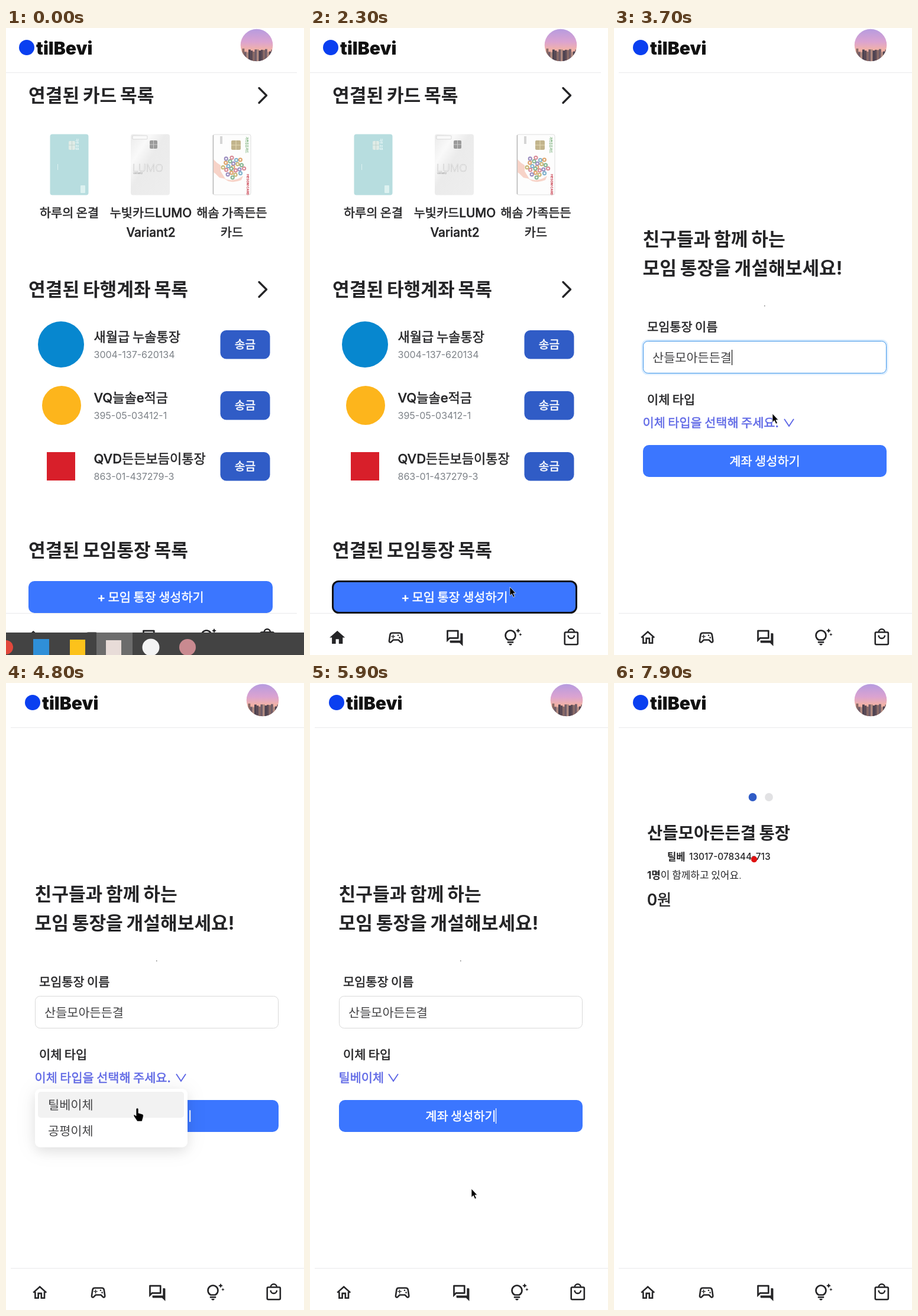
Animation of 504 by 1060 pixels, one loop 8 s. Source, as an HTML page:

```html
<!DOCTYPE html>
<html lang="ko">
<head>
<meta charset="utf-8">
<style>
html, body { margin: 0; width: 100%; height: 100%; overflow: hidden; background: #fff; }
svg { display: block; }
text { font-family: Inter, "Noto Sans CJK KR", "Noto Sans CJK", sans-serif; word-spacing: -.05em; white-space: pre; }
#menuBox { fill: #fff; filter: drop-shadow(0 8px 10px #0001) drop-shadow(0 3px 16px #00000014); }
</style>
</head>
<body>
<svg id="stage" width="504" height="1060" viewBox="0 0 504 1060"></svg>
<script>
const INK = '#252527', SOFT = '#444446', BLUE = '#3b76ff', NAVY = '#305cc6', LINK = '#5f68e6';
const BASE = 20.8;
const ACCOUNT = '산들모아든든결';

// ---- drawing helpers (text is placed by its vertical centre) ----
// A hairline stroke thickens medium text, as the Korean font has no medium weight.
const text = (x, cy, size, str, { w = 500, fill = INK, anchor = 'start', extra = '' } = {}) =>
  `<text x="${x}" y="${cy + size * .37}" font-size="${size}" font-weight="${w}" fill="${fill}" text-anchor="${anchor}"
    ${w === 500 && size > 16 ? `stroke="${fill}" stroke-width=".5"` : ''} ${extra}>${str}</text>`;
const rect = (x, y, w, h, fill, r = 0, extra = '') =>
  `<rect x="${x}" y="${y}" width="${w}" height="${h}" rx="${r}" fill="${fill}" ${extra}/>`;
const circle = (x, y, r, fill, extra = '') => `<circle cx="${x}" cy="${y}" r="${r}" fill="${fill}" ${extra}/>`;
const line = (d, width, color = INK, extra = '') =>
  `<path d="${d}" fill="none" stroke="${color}" stroke-width="${width}" ${extra}/>`;
const group = (id, body, extra = '') => `<g id="${id}" ${extra}>${body}</g>`;
const button = (x, y, w, h, fill, size, label) =>
  rect(x, y, w, h, fill, 10) + text(x + w / 2, y + h / 2, size, label, { fill: '#fff', anchor: 'middle' });
const heading = (x, cy, str) => text(x, cy, 31.2, str, { w: 700 });
const chevron = cy => line(`M428 ${cy - 12}l12.5 12.5l-12.5 12.5`, 3.4, INK, 'stroke-linecap="round" stroke-linejoin="round"');

function header() {
  let seed = 7, skyline = '';
  const random = () => (seed = seed * 16807 % 2147483647) / 2147483647;
  const tones = ['#5b4a55', '#8a6a66', '#6f5c68', '#b08a80', '#4c4250'];
  for (let i = 0; i < 16; i++) {
    const h = 13 + random() * 9;
    skyline += rect(396 + i * 3.5, 56 - h, 3.8, h, tones[i % 5]);
  }
  return circle(35, 33, 13, '#0a3ff0') + text(51, 33.5, 30, 'tilBevi', { w: 900, fill: '#111' }) +
    `<g clip-path="url(#face)">${rect(396, 1, 56, 56, 'url(#sky)')}${skyline}</g>`;
}

function navigation() {
  const home = 'M10 20v-6h4v6h5v-8h3L12 3 2 12h3v8z';
  const icons = [
    `<path id="homeFull" d="${home}"/>` +
      group('homeLine', line('M3.5 12L12 4.4L20.5 12M6 11v8h4v-6h4v6h4v-8', 2)),
    line('M7.5 6h9a3 3 0 0 1 3 2.6l1.1 7.6c.2 1.6-1.4 2.4-2.6 1.4L15.4 15H8.6L6 17.6c-1.2 1-2.8.2-2.6-1.4l1.1-7.6a3 3 0 0 1 3-2.6z', 2) +
      line('M6 10.5h5M8.5 8v5', 1.1) + circle(15, 9, 1, INK) + circle(17, 12, 1, INK),
    '<path transform="scale(1.05)" fill-rule="evenodd" d="M3 2h13a1 1 0 0 1 1 1v9a1 1 0 0 1-1 1H6l-4 4V3a1 1 0 0 1 1-1zM4 4v8.2L5.2 11H15V4zM19 6h2a1 1 0 0 1 1 1v15l-4-4H7a1 1 0 0 1-1-1v-2h13z"/>',
    line('M6 15a6.5 6.5 0 1 1 6 0z', 2) + line('M5 18h8', 2) +
      '<path d="M7 20h4a2 2 0 0 1-4 0zM19 0l1 2l2 1l-2 1l-1 2l-1-2l-2-1l2-1zM22 6l.6 1.4L24 8l-1.4.6L22 10l-.6-1.4L20 8l1.4-.6z"/>',
    line('M5 5h14a1.500 1.500 0 0 1 1.500 1.500V19.500a1.500 1.500 0 0 1-1.500 1.500H5a1.500 1.500 0 0 1-1.500-1.500V6.500A1.500 1.500 0 0 1 5 5zM8 5a4 4 0 0 1 8 0M8 9a4 4 0 0 0 8 0', 2)
  ];
  return icons.map((icon, i) =>
    `<g fill="${INK}" transform="translate(${30.6 + 98.9 * i} 1015) scale(1.3)">${icon}</g>`).join('');
}

function cards() {
  const label = (x, cy, str) => text(x, cy, BASE, str, { anchor: 'middle' });
  const upright = (x, y, size, str, fill) =>
    `<text transform="translate(${x} ${y}) rotate(90)" font-size="${size}" font-weight="700" fill="${fill}">${str}</text>`;
  const dots = ['#dfa46c', '#86b592', '#9c8fc0', '#d98c98', '#82b3cc', '#c9b878'];
  let art = '';
  for (let i = 0; i < 22; i++) {
    const r = 4.1 * Math.sqrt(i), a = i * 2.4, x = 384 + r * Math.cos(a), y = 235 + r * Math.sin(a);
    art += circle(x, y, 3.6, dots[i % 6]) + circle(x, y, 1.5, '#fff');
  }
  return rect(74.5, 179.5, 65, 103, '#b7dddf', 4) + rect(106, 191, 11, 15, '#dfebe6', 2) +
    line('M106 198h11M111.5 191v15', .7, '#b5ccc6') +
    upright(119, 187, 5, '하루 온결', '#eefafa') + rect(126, 266, 8, 13, '#dcf1f0', 1) + rect(87, 230, 1, 10, '#dcf1f0') +
    rect(211, 179.5, 66, 103, 'url(#silver)', 4) + rect(243, 190, 13, 14, '#9a9a9a', 2) +
    line('M243 197h13M249.5 190v14', 1, '#ccc') + rect(214, 182, 25, 6, '#fafafa', 1, 'stroke="#c4c4c4" stroke-width=".6"') +
    text(214, 237, 17.5, 'LUMO', { w: 300, fill: '#f4f4f4', extra: 'stroke="#c4c4c4" stroke-width=".5"' }) +
    text(215, 246, 4, 'Variant2', { fill: '#999' }) +
    rect(350, 180, 64, 102, '#fdfdfd', 3, 'stroke="#dedede"') + line('M350.5 181v100', 1.5, '#bbb') +
    rect(362, 183, 4, 13, '#d5d5d5') + rect(381, 190, 16, 16, '#c2b48c', 2) + line('M381 198h16M389 190v16', 1, '#e5dbb5') +
    '<path d="M351 222l6 6l6 4v10l8 13l-10-2l-7-7l-3-2z" fill="#f7d3c8"/><path d="M368 254q16 8 33-4l-3 7q-12 5-22 2z" fill="#f7d3c8"/>' +
    art + upright(406, 184, 5, '가족든든카드', '#67a568') + upright(407, 247, 5.3, 'HESOM CARD', '#c83a4a') +
    label(107, 312, '하루의 온결') + label(245, 312, '누빛카드LUMO') + label(245, 345, 'Variant2') +
    label(382, 312, '해솜 가족든든') + label(382, 345, '카드');
}

function accountList() {
  const rows = [
    ['새월급 누솔통장', '3004-137-620134', circle(93, 535, 39, '#0787cf')],
    ['VQ늘솔e적금', '395-05-03412-1', circle(94, 638, 33, '#fdb51c')],
    ['QVD든든보듬이통장', '863-01-437279-3', rect(69, 717, 48, 48, '#d81f2a')]
  ];
  return rows.map(([name, number, mark], i) => {
    const y = 103 * i;
    return mark + text(148.5, 522 + y, 22, name) + text(148.5, 552 + y, 16, number, { w: 400, fill: '#7d8288' }) +
      button(362.5, 511 + y, 84, 48.5, NAVY, 19.2, '송금');
  }).join('');
}

const listPage = () =>
  heading(38, 113.5, '연결된 카드 목록') + chevron(113.5) + cards() +
  heading(38, 441.5, '연결된 타행계좌 목록') + chevron(441.5) + accountList() +
  line('M52.5 700v82', 1, '#222', 'id="rowCaret"') +
  heading(38, 882.5, '연결된 모임통장 목록') +
  button(38, 935, 413, 54, BLUE, BASE, '+ 모임 통장 생성하기') +
  rect(38.5, 935.5, 412, 53, 'none', 10, 'id="outline" stroke="#101014" stroke-width="3"');

const formPage = () =>
  heading(48.5, 356.5, '친구들과 함께 하는') + heading(48.5, 405.5, '모임 통장을 개설해보세요!') +
  rect(254, 469, 1.5, 1.5, '#777') + text(56, 505, BASE, '모임통장 이름') +
  rect(48, 528, 414, 57, 'none', 9, 'id="glow" stroke="#d9ecff" stroke-width="3"') +
  rect(49.5, 529.5, 411, 54, '#fff', 8, 'id="field"') +
  text(65, 557, BASE, '', { w: 300, fill: SOFT, extra: 'id="typed"' }) + rect(0, 544, 1.2, 26, '#111', 0, 'id="fieldCaret"') +
  text(56, 628, BASE, '이체 타입') + text(48.5, 667, BASE, '', { fill: LINK, extra: 'id="choice"' }) +
  line('M0 661l8 12l8-12', 1.9, LINK, 'id="arrow"') +
  button(49, 705, 412, 54, BLUE, BASE, '계좌 생성하기') + rect(314, 719, 1.2, 26, '#fff', 0, 'id="buttonCaret"') +
  group('menu', rect(49, 686, 258, 99, '#fff', 9, 'id="menuBox"') + rect(54, 691, 247, 44, '#f2f2f2', 5) +
    text(71, 713, BASE, '틸베이체', { w: 300, fill: SOFT }) + text(71, 757, BASE, '공평이체', { w: 300, fill: SOFT }));

const resultPage = () =>
  circle(234.5, 193, 6.9, NAVY) + circle(262, 193, 6.9, '#e2e2e4') +
  text(56, 253.5, 28.6, ACCOUNT + ' 통장', { w: 700 }) +
  text(90, 293.5, 16.6, '틸베', { w: 700 }) + text(127, 293, 15.4, '13017-078344-713') +
  text(56, 324.5, 16.9, '<tspan font-weight="700">1명</tspan>이 함께하고 있어요.', { w: 300 }) +
  text(56, 366.5, 26.4, '0원');

const taskbar = () =>
  rect(0, 1022, 504, 38, '#434343') + rect(153, 1022, 61, 38, '#6c6c6c') +
  circle(0, 1047, 12, '#e2483c') + rect(46, 1033, 27, 27, '#2f8fd8') + rect(108, 1034, 26, 26, '#fcc21b') +
  rect(169, 1035, 26, 25, '#e8dcd8') + circle(245, 1047, 14.5, '#f4f4f4') + circle(307, 1047, 14, '#c98a90');

const pointers = () =>
  group('arrowPointer', '<path d="M0 0v14.5l3.3-3l2.6 5.700l2.5-1.1l-2.6-5.4H10z" stroke="#fff" stroke-width=".7"/>') +
  group('textPointer', line('M-3 -9q3 0 3 2v14q0 2-3 2M3 -9q-3 0-3 2M3 9q-3 0-3-2', 1.2)) +
  group('handPointer', '<path d="M-2 0q2-3 4 0v7l7 2q2 1 1 5l-2 7h-8l-6-9q-1-3 2-2l2 2z" stroke="#fff" stroke-width=".7"/>') +
  group('dotPointer', circle(0, 0, 5.2, '#e01212'));

document.getElementById('stage').innerHTML = `
  <defs>
    <clipPath id="face"><circle cx="424" cy="29" r="27.3"/></clipPath>
    <linearGradient id="sky" x2="0" y2="1"><stop stop-color="#b59be0"/><stop offset=".4" stop-color="#dba3d0"/>
      <stop offset=".65" stop-color="#f3b3a6"/><stop offset="1" stop-color="#8a6560"/></linearGradient>
    <linearGradient id="silver" x2="1" y2="1"><stop stop-color="#ebebeb"/><stop offset=".25" stop-color="#f9f9f9"/>
      <stop offset=".45" stop-color="#ebebeb"/><stop offset="1" stop-color="#eeeeee"/></linearGradient>
  </defs>` +
  group('rules', line('M0 75.5h492M0 989.5h492', 1, '#e9e9eb')) +
  group('header', header()) + group('navigation', navigation()) +
  group('list', listPage()) + group('form', formPage()) + group('result', resultPage()) +
  group('taskbar', taskbar()) + group('pointer', pointers());

// ---- timeline ----
const el = id => document.getElementById(id);
const show = (id, on) => { el(id).style.display = on ? '' : 'none'; };
const progress = (t, from, to) => Math.min(1, Math.max(0, (t - from) / (to - from)));
const within = (t, from, to) => t >= from && t < to;

// Every keystroke of a Hangul word: lead consonant, then vowel, then final.
function keystrokes(word) {
  const leads = 'ㄱㄲㄴㄷㄸㄹㅁㅂㅃㅅㅆㅇㅈㅉㅊㅋㅌㅍㅎ', states = [''];
  [...word].forEach((syllable, i) => {
    const code = syllable.charCodeAt(0) - 0xac00, final = code % 28, done = word.slice(0, i);
    states.push(done + leads[Math.floor(code / 588)], done + String.fromCharCode(0xac00 + code - final));
    if (final) states.push(done + syllable);
  });
  return states;
}
const typing = keystrokes(ACCOUNT);

const route = [
  [500, 510, 1000], [1000, 485.5, 782.5], [1300, 485.5, 782.5], [1900, 338, 945], [2500, 338, 945],
  [2900, 270, 560], [3300, 270, 560], [3700, 268, 652], [4100, 268, 658], [4500, 222, 720], [4900, 222, 720],
  [5600, 273, 855], [6000, 273, 855], [6400, 280, 735], [6900, 280, 735], [7300, 265, 508],
  [7400, 265, 508], [7800, 237, 298], [8000, 237, 298]
];
function pointerAt(t) {
  const i = Math.max(1, route.findIndex(stop => stop[0] > t));
  const [t0, x0, y0] = route[i - 1], [t1, x1, y1] = route[i];
  const p = progress(t, t0, t1), e = p * p * (3 - 2 * p);
  return [x0 + (x1 - x0) * e, y0 + (y1 - y0) * e];
}

function draw(t) {
  const onList = t < 2500, onForm = within(t, 2500, 6700);
  show('list', onList);
  show('form', onForm);
  show('result', t >= 6700);
  show('homeFull', onList);
  show('homeLine', !onList);
  el('header').setAttribute('transform', `translate(${onList ? 0 : 10} 0)`);
  el('navigation').setAttribute('transform', `translate(${onList ? 0 : 11} 0)`);
  el('rules').setAttribute('transform', onList ? '' : 'translate(8 0) scale(1.008 1)');

  show('taskbar', t < 800);
  el('taskbar').setAttribute('transform', `translate(0 ${38 * progress(t, 400, 800)})`);
  show('rowCaret', within(t, 1000, 1600));
  show('outline', t >= 2000);

  const focused = within(t, 3000, 4100);
  const typed = el('typed');
  typed.textContent = typing[Math.round(progress(t, 3000, 3600) * (typing.length - 1))];
  el('field').setAttribute('stroke', focused ? '#4096e8' : '#d9d9d9');
  show('glow', focused);
  show('fieldCaret', focused);
  if (onForm) el('fieldCaret').setAttribute('x', 65 + typed.getComputedTextLength());

  const chosen = t >= 5000;
  el('choice').textContent = chosen ? '틸베이체' : '이체 타입을 선택해 주세요.';
  el('arrow').setAttribute('transform', `translate(${chosen ? 133 : 288} 0)`);
  show('buttonCaret', within(t, 5700, 6200));
  const open = progress(t, 4000, 4300);
  show('menu', within(t, 4100, 5000));
  el('menu').setAttribute('opacity', open);
  el('menu').setAttribute('transform', `translate(0 ${686 * .2 * (1 - open)}) scale(1 ${.8 + .2 * open})`);

  const [x, y] = pointerAt(t);
  const kind = t >= 7800 ? 'dot' : within(t, 4400, 5000) ? 'hand' : within(t, 2800, 3500) ? 'text' : 'arrow';
  show('pointer', t >= 500);
  el('pointer').setAttribute('transform', `translate(${x} ${y})`);
  for (const name of ['arrow', 'text', 'hand', 'dot']) show(name + 'Pointer', name === kind);
}

const start = performance.now();
function frame() {
  const t = (performance.now() - start) % 8000;
  draw(Math.floor(t / 100) * 100);
  requestAnimationFrame(frame);
}
frame();
</script>
</body>
</html>
```
